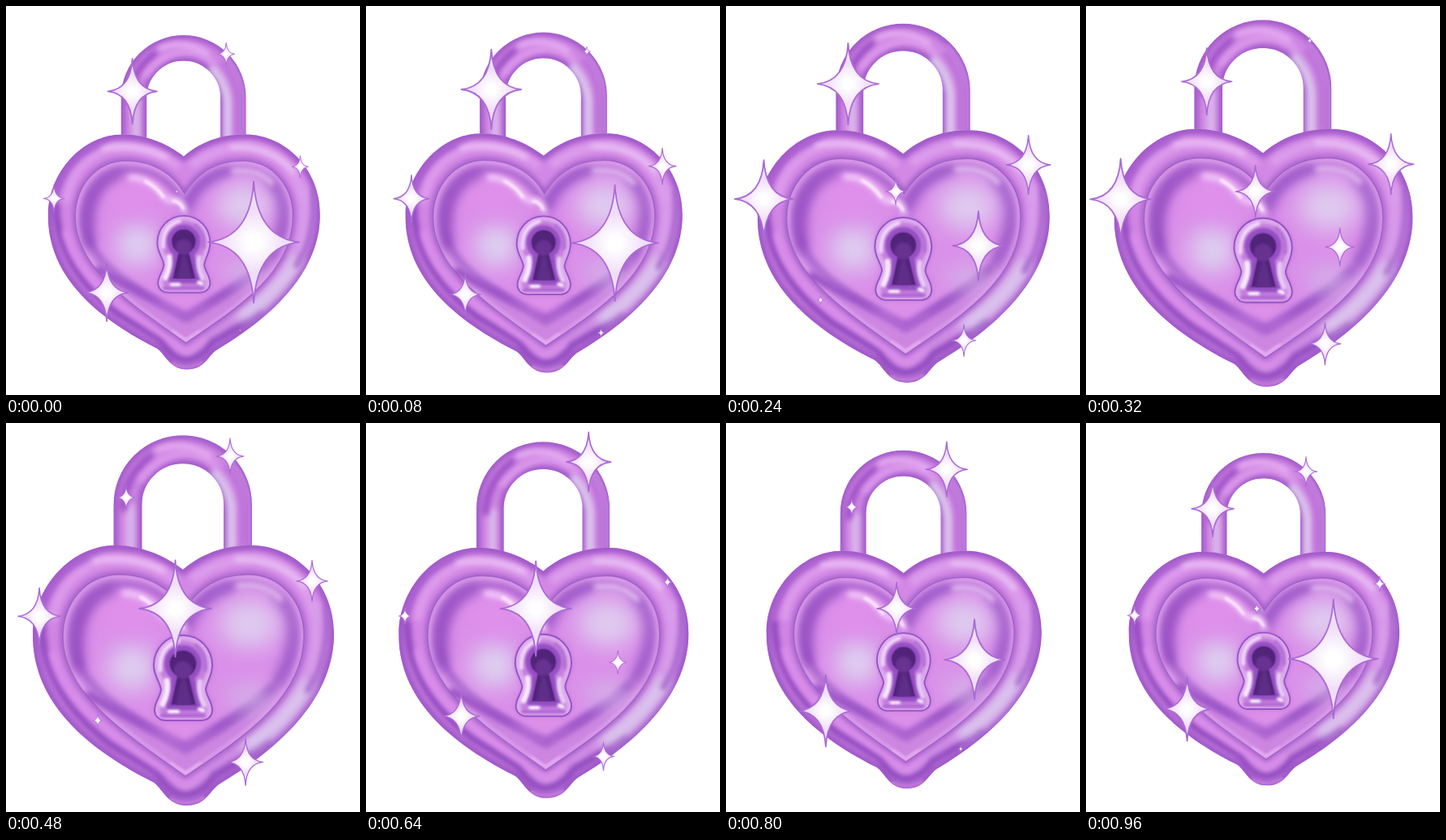
Animation, 436 px wide and 480 px high, one loop 1000 ms. Source, as an HTML page:

```html
<!DOCTYPE html>
<html>
<head>
<meta charset="utf-8">
<style>
html, body { margin: 0; width: 100%; height: 100%; overflow: hidden; background: #fff; }
svg { display: block; width: 436px; height: 480px; }
.line { fill: none; stroke-linecap: round; stroke-linejoin: round; }
.b2 { filter: url(#b2); }
.b4 { filter: url(#b4); }
.b8 { filter: url(#b8); }
.b14 { filter: url(#b14); }
#stars path { fill: url(#glint); stroke: #ab6bd5; stroke-linejoin: round; vector-effect: non-scaling-stroke; }
</style>
</head>
<body>
<svg viewBox="0 0 436 480">
  <defs>
    <path id="bow" d="M150 175V100.500A67.750 67.750 0 0 1 285.500 100.500V175"/>
    <path id="heart" d="M218 181C195 163 165 151 135 151C80 151 33 203 33 262C33 335 84 394 181 443C192 449 198 472 222 472C246 472 250 455 262 446C345 397 404 335 404 260C404 197 355 151 302 151C268 151 240 162 218 181Z"/>
    <path id="inner" d="M219 232C205 205 175 187 140 187C98 187 70 222 70 264C70 335 150 385 221 436C292 388 367 340 367 262C367 220 338 187 298 187C260 187 235 205 219 232Z"/>
    <path id="pillow" d="M219 250C205 218 178 200 145 200C108 200 83 228 83 266C83 325 155 362 221 404C287 364 354 325 354 264C354 226 330 200 296 200C260 200 235 218 219 250Z"/>
    <path id="plate" d="M218 262C240 262 254 280 254 299C254 312 247 320 246 329C247 338 254 344 254 354C254 362 248 367 240 367H197C188 367 183 361 183 354C183 345 190 338 191 329C190 320 182 312 182 299C182 280 196 262 218 262Z"/>
    <path id="hole" d="M211 312A16.500 16.500 0 1 1 225 312L234 348H203Z"/>
    <clipPath id="inHeart"><use href="#heart"/></clipPath>
    <clipPath id="inInner"><use href="#inner"/></clipPath>
    <clipPath id="inPlate"><use href="#plate"/></clipPath>
    <clipPath id="inHole"><use href="#hole"/></clipPath>
    <mask id="inBow" maskUnits="userSpaceOnUse" x="0" y="0" width="436" height="480">
      <use href="#bow" class="line" stroke="#fff" stroke-width="35"/>
    </mask>
    <filter id="b2" filterUnits="userSpaceOnUse" x="0" y="0" width="436" height="490"><feGaussianBlur stdDeviation="1.500"/></filter>
    <filter id="b4" filterUnits="userSpaceOnUse" x="0" y="0" width="436" height="490"><feGaussianBlur stdDeviation="3.500"/></filter>
    <filter id="b8" filterUnits="userSpaceOnUse" x="0" y="0" width="436" height="490"><feGaussianBlur stdDeviation="7"/></filter>
    <filter id="b14" filterUnits="userSpaceOnUse" x="0" y="0" width="436" height="490"><feGaussianBlur stdDeviation="14"/></filter>
    <linearGradient id="body" x1="0" y1="0" x2="1" y2="1">
      <stop offset="0" stop-color="#cf83e2"/>
      <stop offset=".6" stop-color="#d68ce7"/>
      <stop offset="1" stop-color="#c58fdf"/>
    </linearGradient>
    <radialGradient id="glint" gradientUnits="userSpaceOnUse" cx="0" cy="0" r="1">
      <stop offset=".15" stop-color="#fff"/>
      <stop offset=".7" stop-color="#f0ddf9"/>
    </radialGradient>
  </defs>

  <g id="lock">
    <!-- shackle -->
    <g class="line" mask="url(#inBow)">
      <use href="#bow" stroke="#a25bca" stroke-width="36"/>
      <use href="#bow" class="b4" stroke="#cf85e2" stroke-width="24"/>
      <path class="b4" d="M153 170V105" stroke="#d9b6ea" stroke-width="11"/>
      <path class="b4" d="M144 105Q146 66 178 41" stroke="#a052c8" stroke-width="10"/>
      <path class="b4" d="M166 70Q188 41 218 37Q242 37 258 52" stroke="#dd9aec" stroke-width="8"/>
      <path class="b4" d="M186 33Q218 20 250 40" stroke="#e9b3f3" stroke-width="6"/>
      <path class="b4" d="M258 62Q275 80 278 106V158" stroke="#dac4ec" stroke-width="11"/>
      <path class="b4" d="M291 150V104Q290 76 272 54" stroke="#b56cd6" stroke-width="6"/>
      <path class="b2" d="M300 150V102Q298 66 274 43" stroke="#c583e0" stroke-width="3"/>
    </g>

    <!-- outer heart -->
    <use href="#heart" fill="url(#body)"/>
    <g class="line" clip-path="url(#inHeart)">
      <use href="#heart" class="b4" stroke="#a058c9" stroke-width="13"/>
      <path class="b4" d="M44 248Q44 330 128 396L186 432Q204 460 222 459Q241 458 257 435Q300 411 322 394" stroke="#9149bf" stroke-width="10"/>
      <path class="b4" d="M43 240Q56 180 112 163" stroke="#a75dce" stroke-width="7"/>
      <path class="b4" d="M58 240Q66 190 116 172Q165 164 208 193" stroke="#dd9bec" stroke-width="10"/>
      <path class="b4" d="M108 170Q152 161 194 182" stroke="#eec3f6" stroke-width="6"/>
      <path class="b4" d="M232 191Q270 166 308 167Q362 177 382 238" stroke="#dc9dec" stroke-width="11"/>
      <path class="b4" d="M284 168Q340 168 368 202" stroke="#eac4f4" stroke-width="6"/>
      <path class="b4" d="M58 285Q72 345 150 395L204 432L222 446L242 430" stroke="#da8dea" stroke-width="10"/>
      <path class="b8" d="M298 397Q342 372 372 322" stroke="#dccbee" stroke-width="18"/>
      <path class="b4" d="M394 230Q400 280 372 330" stroke="#a969cf" stroke-width="8"/>
      <path class="b4" d="M380 225Q386 270 374 306" stroke="#d79dea" stroke-width="10"/>
      <path class="b2" d="M203 464Q222 474 243 463" stroke="#c47ddc" stroke-width="4"/>
      <use href="#inner" class="b4" stroke="#9b58c5" stroke-width="6"/>
    </g>

    <!-- inner heart -->
    <use href="#inner" fill="#cd86e1"/>
    <g class="line" clip-path="url(#inInner)">
      <use href="#inner" class="b2" stroke="#d798e8" stroke-width="11"/>
      <use href="#pillow" fill="#da8fe9"/>
      <use href="#pillow" class="b4" stroke="#ad68d0" stroke-width="9"/>
      <path class="b8" d="M90 300Q78 225 130 206" stroke="#9149bf" stroke-width="15"/>
      <path class="b4" d="M102 336Q170 374 221 398Q285 364 326 328" stroke="#9d55c7" stroke-width="11"/>
      <path class="b8" d="M224 252Q234 216 276 203" stroke="#9f59ca" stroke-width="14"/>
      <path class="b8" d="M336 318Q366 255 335 216" stroke="#a25dcb" stroke-width="13"/>
      <ellipse class="b14" cx="155" cy="302" rx="30" ry="29" fill="#decff0"/>
      <ellipse class="b14" cx="300" cy="248" rx="38" ry="30" fill="#dfcaef"/>
      <ellipse class="b14" cx="300" cy="338" rx="28" ry="16" fill="#d4b2e8"/>
      <ellipse class="b14" cx="150" cy="235" rx="32" ry="20" fill="#e190ec"/>
      <ellipse class="b14" cx="215" cy="376" rx="30" ry="12" fill="#dd91eb"/>
      <path class="b4" d="M146 210Q172 211 187 232Q198 245 206 240Q217 241 219 256" stroke="#f2c6f8" stroke-width="8"/>
      <path class="b2" d="M166 215Q180 222 190 236M204 242Q213 243 217 252" stroke="#fdeafe" stroke-width="4"/>
      <path class="b4" d="M286 201Q318 197 338 217" stroke="#e6bdf2" stroke-width="7"/>
      <path class="b2" d="M203 420L221 432L239 420" stroke="#e9b0f2" stroke-width="3"/>
    </g>
    <use href="#inner" class="line" stroke="#9351bf" stroke-width="1.500" opacity=".65"/>

    <!-- keyhole -->
    <use href="#plate" class="b4" fill="#9c57c6" opacity=".5"/>
    <use href="#plate" fill="#c67fdf"/>
    <g class="line" clip-path="url(#inPlate)">
      <use href="#plate" class="b2" stroke="#dca8ec" stroke-width="13"/>
      <use href="#hole" class="b2" stroke="#9550c2" stroke-width="13"/>
      <path class="b2" d="M190 305Q188 277 212 269" stroke="#f3daf9" stroke-width="5"/>
      <path class="b2" d="M198 318Q201 331 193 347" stroke="#f8e9fc" stroke-width="7"/>
      <path class="b2" d="M239 319Q236 332 244 348" stroke="#e9cdf5" stroke-width="6"/>
      <path class="b2" d="M245 305Q247 285 234 275" stroke="#b46fd6" stroke-width="5"/>
      <path class="b2" d="M192 361H244" stroke="#b165d3" stroke-width="5"/>
      <path class="b2" d="M201 356H212M238 353L243 355" stroke="#fff" stroke-width="4"/>
    </g>
    <use href="#plate" class="line" stroke="#9654c5" stroke-width="2"/>
    <use href="#hole" fill="#512479" stroke="#7b3ea8" stroke-width="1.500"/>
    <g clip-path="url(#inHole)">
      <circle class="b2" cx="218" cy="305" r="11" fill="#683291"/>
      <path class="b2" d="M216 317L208 352H230L221 317Z" fill="#5f2e88"/>
    </g>

    <g id="stars"></g>
  </g>
</svg>
<script>
const LOOP = 1000, STEP = 40;
const lock = document.getElementById('lock');
const layer = document.getElementById('stars');

// 1 at the peak time, 0 half a loop away
const pulse = (t, peak) => .5 + .5 * Math.cos(2 * Math.PI * (t - peak) / LOOP);

// x, y, largest half width, peak time
const stars = [
  [148, 92, 42, 150],
  [276, 41, 30, 713],
  [377, 195, 28.5, 285],
  [41, 238.5, 38, 291],
  [113, 367, 37, 850],
  [295, 418.5, 22, 428],
  [208.5, 229, 48, 567],
  [313.5, 298, 62, 1000]
].map(([x, y, size, peak]) => {
  const el = document.createElementNS('http://www.w3.org/2000/svg', 'path');
  el.setAttribute('d', 'M0-1.34Q.07-.1 1 0Q.07.1 0 1.34Q-.07.1-1 0Q-.07-.1 0-1.34Z');
  layer.append(el);
  return { el, x, y, size, peak };
});

function draw(now) {
  const t = Math.floor(now % LOOP / STEP) * STEP;
  const zoom = .8975 + .105 * pulse(t, 428);
  lock.setAttribute('transform', `translate(227 229) scale(${zoom}) translate(-227 -229)`);
  for (const { el, x, y, size, peak } of stars) {
    const r = size * pulse(t, peak);
    el.setAttribute('transform', `translate(${x} ${y}) scale(${Math.max(r, .01)})`);
    el.setAttribute('stroke-width', Math.min(1.8, .5 + r * .04));
    el.setAttribute('visibility', r < .4 ? 'hidden' : 'visible');
  }
  requestAnimationFrame(draw);
}
draw(performance.now());
</script>
</body>
</html>
```
